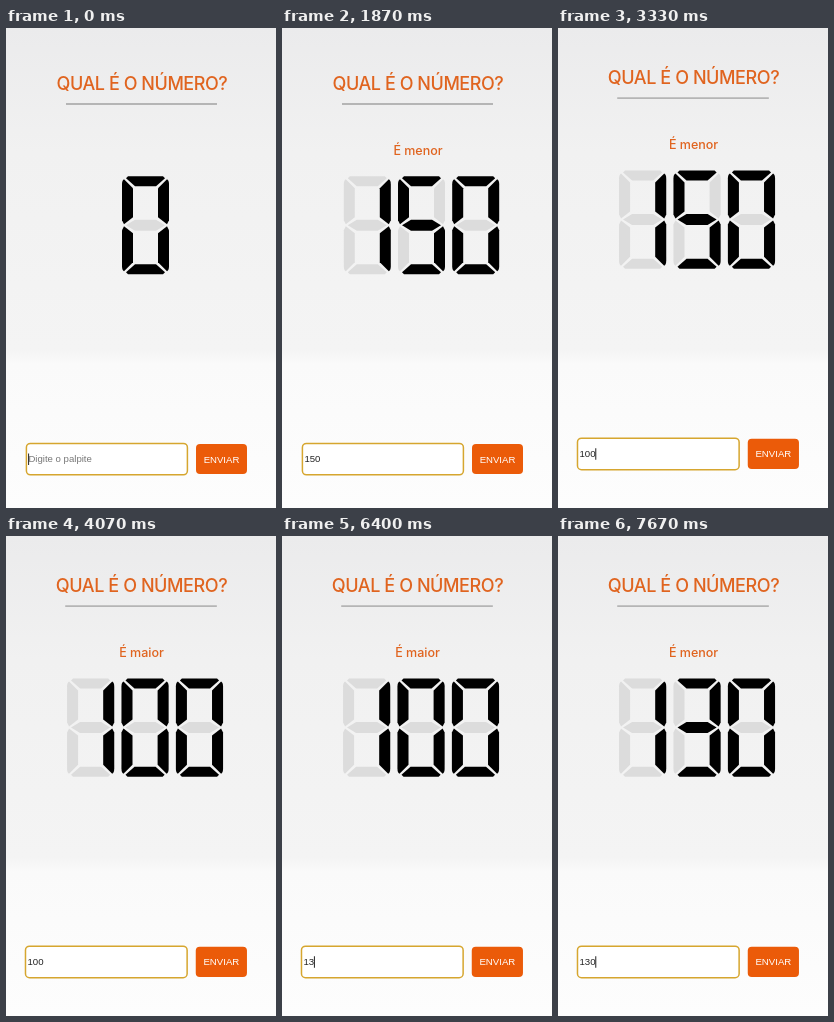
An HTML page for the animation above (8 s loop, 270 px wide and 480 px high).

```html
<!DOCTYPE html>
<html lang="pt-BR">
<head>
<meta charset="utf-8">
<title>Qual é o número?</title>
<style>
html, body { margin: 0; width: 100%; height: 100%; overflow: hidden; }
svg { display: block; width: 100vw; height: 100vh;
  background: linear-gradient(#ebebec 0, #f1f1f1 26%, #f4f4f4 67%, #fafafa 70%, #fdfdfd 100%); }
.head { font-family: Inter, Lato, sans-serif; font-weight: 500; fill: #e0641f; text-anchor: middle; }
#title { font-size: 18px; letter-spacing: -.45px; }
#msg { font-size: 12.5px; }
.form { font: 9.6px "Liberation Sans", Arial, sans-serif; }
</style>
</head>
<body>
<svg viewBox="0 0 270 480" preserveAspectRatio="none">
  <g id="page">
    <text id="title" class="head" x="136" y="61.5">QUAL É O NÚMERO?</text>
    <path d="M60 76H211" stroke="#b5b5b5" stroke-width="1.8"/>
    <text id="msg" class="head" x="136" y="127"></text>
    <g id="display"></g>
    <rect x="20.4" y="415.4" width="161" height="31.4" rx="4" fill="#fff" stroke="#d6a62f" stroke-width="1.5"/>
    <text id="field" class="form" x="22.4" y="434.3"></text>
    <path id="caret" d="M0 425.5V437" stroke="#222" stroke-width="1"/>
    <rect x="190" y="416" width="51" height="30" rx="4" fill="#eb5b09"/>
    <text class="form" x="215.5" y="434.5" fill="#fff" text-anchor="middle">ENVIAR</text>
  </g>
</svg>
<script>
const LOOP = 8000;
const $ = id => document.getElementById(id);

// Segments a to g inside a 47 x 98 cell
const SEGMENTS = [
  'M6 0H41L43 2L34 10H13L4 2Z',
  'M45 3Q47 4 47 8V44L45 48L36 41V12Z',
  'M45 50L47 54V90Q47 94 45 95L36 86V57Z',
  'M6 98H41L43 96L34 88H13L4 96Z',
  'M2 50L0 54V90Q0 94 2 95L11 86V57Z',
  'M2 3Q0 4 0 8V44L2 48L11 41V12Z',
  'M4 49L13 43.5H34L43 49L34 54.5H13Z'
];
const LIT = { 0: 'abcdef', 1: 'bc', 3: 'abcdg', 5: 'acdfg' };

// Each track lists [start time, value]
const TYPED = [[0, ''], [400, '1'], [670, '15'], [930, '150'], [2800, '15'], [2870, '1'],
  [3070, '10'], [3330, '100'], [5470, '10'], [5530, '1'], [6400, '13'], [6670, '130']];
const MESSAGE = [[0, ''], [1400, 'É menor'], [3600, 'É maior'], [7000, 'É menor']];
const NUMBER = [[0, '0'], [1470, '150'], [3670, '100'], [7070, '130']];
const CARET = [[0, 1], [1470, 0], [2000, 1], [2530, 0], [2800, 1], [3860, 0], [4395, 1],
  [4865, 0], [5395, 1], [6060, 0], [6400, 1], [7190, 0], [7665, 1]];
const SCROLL = [[0, ''], [2800, 'translate(-1 -6) scale(1.004 1.002)']];

const at = (track, t) => track.filter(([start]) => start <= t).pop()[1];

function digit(d, i, all) {
  const x = 116 + (i - (all.length - 1) / 2) * 54.2;
  const parts = SEGMENTS.map((path, k) =>
    `<path d="${path}" fill="${LIT[d].includes('abcdefg'[k]) ? '#000' : '#dcdcdc'}"/>`);
  return `<g transform="translate(${x} 148.2)">${parts.join('')}</g>`;
}

let shown;
function draw(now) {
  const t = now % LOOP;
  const typed = at(TYPED, t), number = at(NUMBER, t);
  $('page').setAttribute('transform', at(SCROLL, t));
  $('msg').textContent = at(MESSAGE, t);
  $('field').textContent = typed || 'Digite o palpite';
  $('field').setAttribute('fill', typed ? '#222' : '#777');
  $('caret').setAttribute('transform', `translate(${22.6 + typed.length * 5.34} 0)`);
  $('caret').setAttribute('opacity', at(CARET, t));
  if (number !== shown) $('display').innerHTML = [...(shown = number)].map(digit).join('');
  requestAnimationFrame(draw);
}
draw(performance.now());
</script>
</body>
</html>
```
